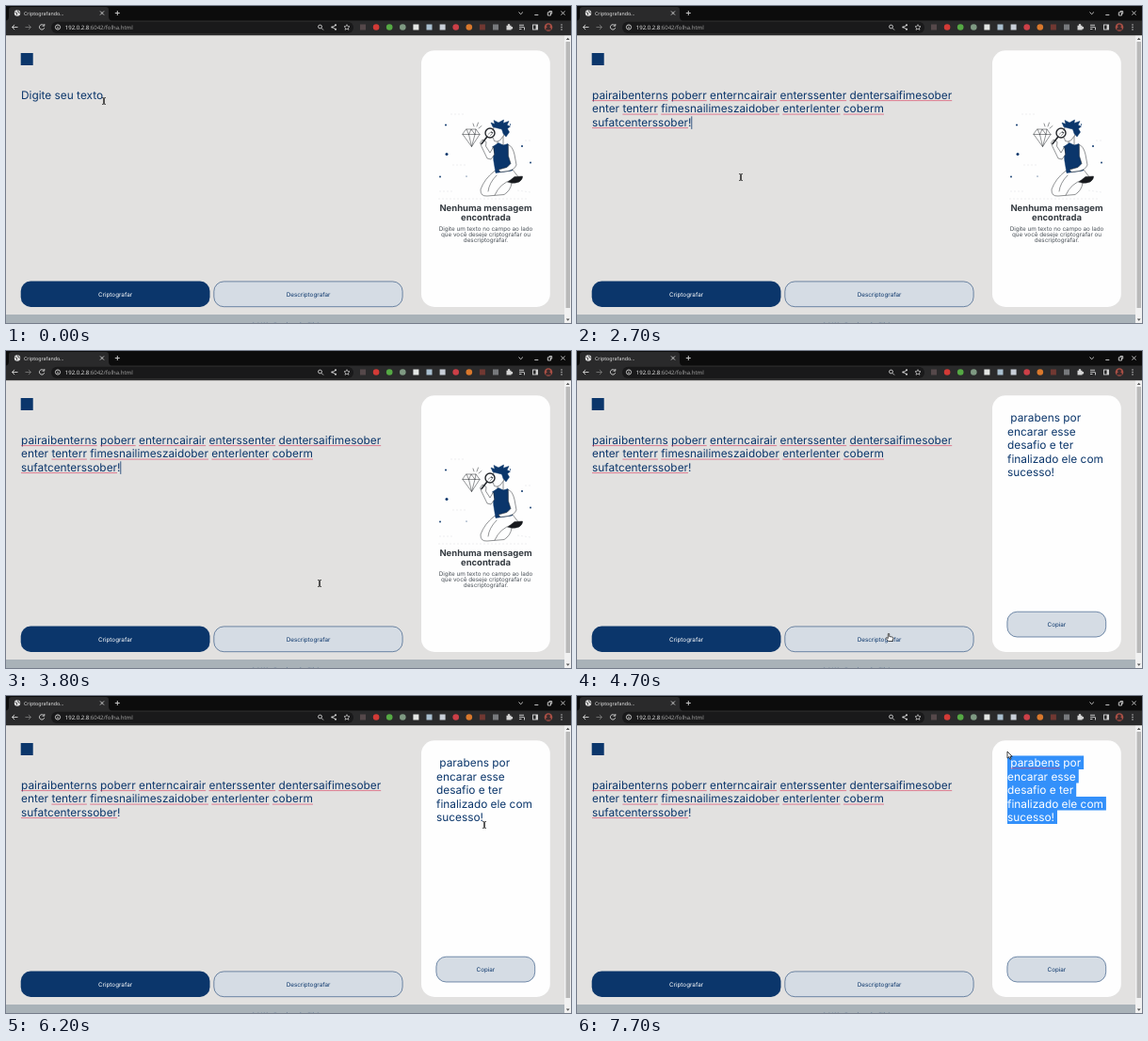
An HTML page that plays this animation: 600x337 px, repeating every 8 s.

```html
<!DOCTYPE html>
<html lang="pt">
<head>
<meta charset="utf-8">
<title>Criptografando...</title>
<style>
  html, body { margin: 0; width: 100%; height: 100%; overflow: hidden; background: #e2e1e0; }
  svg { display: block; width: 600px; height: 337px; }
  text { font-family: Inter, "Open Sans", sans-serif; font-optical-sizing: none; white-space: pre; text-rendering: geometricPrecision; }
  .big { font-size: 11.86px; fill: #0b366b; }
  .btn { font-size: 6.3px; fill: #0b366b; text-anchor: middle; }
  .head { font-size: 9.48px; font-weight: 700; fill: #343a40; text-anchor: middle; }
  .para { font-size: 6.3px; fill: #495057; text-anchor: middle; }
  .foot { font: 6.32px "Liberation Serif", serif; fill: #0b366b; text-anchor: middle; }
  .ui { font-family: "Noto Sans", "Open Sans", sans-serif; fill: #e4e4e4; }
  .ico { fill: none; stroke: #d6d6d6; stroke-width: .9; }
  .ink { fill: #fefefe; stroke: #23262b; stroke-width: .5; stroke-linejoin: round; stroke-linecap: round; }
  .line { fill: none; }
  .blue { fill: #0b366b; stroke: #0b366b; }
  .red { stroke: #d8365c; stroke-width: .6; }
  .pale { fill: #d5dce4; stroke: #0b366b; stroke-width: .55; }
</style>
</head>
<body>
<svg viewBox="0 0 600 337" xmlns="http://www.w3.org/2000/svg">
  <defs><clipPath id="sel"></clipPath></defs>
  <rect width="600" height="337" fill="#e2e1e0"/>

  <g id="page">
    <rect x="15.700" y="50" width="13" height="13" fill="#0b366b"/>
    <text id="hint" class="big" x="16" y="98.800">Digite seu texto</text>
    <g id="input"></g>
    <rect id="caret" width=".8" height="13.600" fill="#0b366b"/>

    <rect x="15.700" y="292.600" width="200.800" height="27.300" rx="10.500" fill="#0b366b"/>
    <text class="btn" x="116" y="308.500" style="fill:#fff">Criptografar</text>
    <rect class="pale" x="220.800" y="292.900" width="200.300" height="26.800" rx="10.500"/>
    <text class="btn" x="321" y="308.500">Descriptografar</text>

    <rect x="441" y="47.300" width="136.800" height="272.600" rx="14" fill="#fefefe"/>

    <g id="empty">
      <g fill="none" stroke="#dcdfe3" stroke-width=".5">
        <path d="M460 197h14M459 205h96M551 143h8M472 115h14M543 196l14 2M474 169h16" stroke-dasharray="2 2"/>
      </g>
      <g id="dots"></g>
      <g class="ink">
        <path d="M489 131h10l4 5.500L494.500 149.500 485 136.500zM485 136.500h18M489 131l2.500 5.500 3 13 3.500-13 1-5.500M491.500 136.500l2.500-5.500 4 5.500"/>
        <path class="line" d="M497 128l-1-3M500 128l1.500-4M502 130l3-2.500"/>
        <path d="M518 176Q508 184 504 195Q503.500 202.500 511 202L529 200.500Q536 196 537 188L545 183 538 174z"/>
        <path class="line" d="M537 185Q525 188 519 201M521 180Q513 188 512 197"/>
        <path d="M533 187Q537 184 540 181.500L548.500 181Q549 184 545 187Q540 189 536 188z" fill="#17191d"/>
        <path d="M522 140v7l6 1v-12z"/>
        <path d="M518 129Q516.500 134 517 137L515.800 139.500 517.500 140.500 518.500 143.500Q521 145 524.500 143L529 137 528 128z"/>
        <path class="blue" d="M517 128.500L515 124 519 125.500 518 121.500 523 124 528.500 121 528 124.500 534 122.500 532 126.500 535.500 128 532.500 130.500 534.500 134 531 139 528 135.500 526.500 131 520.500 129.500z"/>
        <path class="blue" d="M517 149.500L523 145.500 528 148 533 146.500Q538 159 537.500 175L520 177.500Q517 164 517 149.500z"/>
        <path d="M517.500 150L514 156 509.500 149 510 144.500 506 142 503.500 145.500 505 149.500 511 162 515 163 518.500 158z"/>
        <path d="M533.500 147.500Q538 149 540 158L542 169Q540 174 533 175.500L525 176.500 523 174 532 171.500 536 167.500 533.500 159.500z"/>
        <path class="line" d="M510.500 139.500L505 146.500" stroke-width="1.600"/>
        <circle cx="514" cy="135" r="5" fill="#fefefe" stroke-width="1.400"/>
        <path class="line" d="M512 136.500l4-3.500M514 138l3-3"/>
        <circle cx="516" cy="134.500" r=".5" fill="#23262b"/>
      </g>
      <text class="head" x="509.500" y="218.400">Nenhuma mensagem</text>
      <text class="head" x="509.500" y="227.800">encontrada</text>
      <text class="para" x="509.500" y="238.900">Digite um texto no campo ao lado</text>
      <text class="para" x="509.500" y="245.100">que você deseje criptografar ou</text>
      <text class="para" x="509.500" y="251.400">descriptografar.</text>
    </g>

    <g id="result">
      <g id="output"></g>
      <g clip-path="url(#sel)">
        <rect x="450" y="60" width="120" height="80" fill="#3390fa"/>
        <g id="picked"></g>
      </g>
      <path id="typo" class="red"/>
      <rect class="pale" x="456.900" y="277.200" width="104.800" height="26.800" rx="10.500"/>
      <text class="btn" x="509.400" y="292.500">Copiar</text>
    </g>

    <rect y="328" width="593" height="19" fill="#a9b2b8"/>
    <text class="foot" x="297" y="340.700">© 2022 - <tspan text-decoration="underline">Developer by Zib®</tspan></text>
  </g>

  <rect x="593" y="31" width="7" height="306" fill="#f1f1f1"/>
  <rect id="thumb" x="594.500" y="38" width="4.500" height="283" fill="#b9b9b9"/>
  <path d="M594.800 36l1.900-2.200 1.900 2.200zM594.800 332.500l1.900 2.200 1.900-2.200z" fill="#555"/>

  <rect width="600" height="16" fill="#0c0c0c"/>
  <path d="M0 31.300V15.500Q3 15 3 11V4Q3 1 6 1H106Q109 1 109 4V11Q109 15 112 15.500H600V31.300z" fill="#2a2a2b"/>
  <circle cx="12" cy="7.500" r="3.200" fill="#dedede"/>
  <path d="M9.500 6.500l2 1v2M12.500 4.500l.5 2 1.800 1" fill="none" stroke="#2a2a2b" stroke-width=".8"/>
  <text class="ui" x="19" y="9.500" font-size="5.300">Criptografando...</text>
  <rect x="48" y="16.800" width="321" height="12.200" rx="6.100" fill="#19191a"/>
  <text class="ui" x="62.800" y="24.800" font-size="6">192.0.2.8<tspan fill="#a2a2a2">:6042/folha.html</tspan></text>
  <g class="ico">
    <path d="M100 5.500l4 4m0-4l-4 4M115.800 7.500h5M118.300 5v5M544.500 6.500l2.200 2.200 2.200-2.200M561.300 9.500h4M575.300 6.800h3.200v3.200h-3.200zM576.700 5.500h3v3M589.500 5.500l4 4m0-4l-4 4"/>
    <path d="M12.500 22.500h-6m2.600-2.600l-2.600 2.600 2.600 2.600"/>
    <path d="M20.500 22.500h6m-2.600-2.600l2.600 2.600-2.600 2.600" stroke="#777"/>
    <path d="M40.300 20.800a2.700 2.700 0 1 0 .4 2.400M40.800 19v2.200h-2.200"/>
    <circle cx="55" cy="22.500" r="2.600"/><path d="M55 22v2M55 20.600v.7"/>
    <circle cx="333.500" cy="22" r="1.900"/><path d="M335 23.500l2 2"/>
    <path d="M350 20.500l-3.500 2 3.500 2.200"/>
    <path d="M362 19.700l.9 1.900 2.100.2-1.600 1.400.5 2.100-1.900-1.100-1.900 1.100.5-2.100-1.600-1.400 2.100-.2z" stroke-width=".7"/>
    <path d="M545 20.300h5M545 22.400h5M545 24.500h2.500M550.500 22.500v3"/>
    <rect x="559.500" y="20" width="5" height="5"/><path d="M563.500 20v5" stroke-width="1.800"/>
  </g>
  <g fill="#d6d6d6">
    <circle cx="350" cy="20.300" r="1"/><circle cx="346.300" cy="22.500" r="1"/><circle cx="350" cy="24.700" r="1"/>
    <path d="M531.500 20.800h1.400a1.200 1.200 0 1 1 2.200 0h1.400v1.400a1.200 1.200 0 1 1 0 2.200v1.200h-5z"/>
    <circle cx="590" cy="20" r=".7"/><circle cx="590" cy="22.500" r=".7"/><circle cx="590" cy="25" r=".7"/>
  </g>
  <g id="addons"></g>
  <circle cx="576" cy="22.500" r="4.300" fill="#a94f45"/>
  <path d="M573 25.500q0-2.500 1.700-2.700a1.900 1.900 0 1 1 2.600 0q1.700.2 1.700 2.700z" fill="#3a2b2c"/>

  <g id="mouse">
    <path id="beam" d="M-1.800-3.500q1.800 0 1.800 1v5q0 1-1.800 1M1.800-3.500q-1.800 0-1.800 1v5q0 1 1.800 1" fill="none" stroke="#111" stroke-width=".9"/>
    <path id="arrow" d="M0 0v7.200l1.700-1.500 1.200 2.600 1.200-.6-1.200-2.400h2.300z" fill="#fff" stroke="#111" stroke-width=".8"/>
    <path id="hand" d="M-.7.700q.7-1.200 1.400 0v2.800l3.300.6q.9.300.8 1.200l-.6 3.200h-4.500l-2.700-3q0-1 1-.8l1.300.9z" fill="#fff" stroke="#111" stroke-width=".7"/>
  </g>
</svg>
<script>
const $ = id => document.getElementById(id);
const LOOP = 8000, STEP = 100, LINE = 14.5;
const PASTE = 1600, SPELL = 1800, DECODE = 4500, DRAG = 6200;

const cipher = ["pairaibenterns poberr enterncairair enterssenter dentersaifimesober",
  "enter tenterr fimesnailimeszaidober enterlenter coberm", "sufatcenterssober!"];
const plain = [" parabens por", "encarar esse", "desafio e ter", "finalizado ele com", "sucesso!"];

// time, x, y
const path = [[0, 104, 101], [2000, 104, 101], [2700, 174, 182], [3000, 262, 214], [3300, 330, 235],
  [3800, 333, 247], [4000, 333, 247], [4400, 331, 300], [4800, 331, 300], [5200, 408, 252],
  [5700, 496, 170], [6200, 508, 137], [6600, 503, 130], [6900, 490, 112], [7000, 490, 112], [7700, 457, 59]];
const scroll = [[0, 0], [2900, 0], [3200, 10], [3600, 10], [3800, 0]];

function add(parent, tag, attrs, text = "") {
  const el = document.createElementNS("http://www.w3.org/2000/svg", tag);
  for (const k in attrs) el.setAttribute(k, attrs[k]);
  el.textContent = text;
  parent.appendChild(el);
  return el;
}

function at(keys, t, col) {
  const i = keys.findIndex(k => k[0] > t);
  if (i < 0) return keys[keys.length - 1][col];
  const a = keys[i - 1], b = keys[i];
  return a[col] + (b[col] - a[col]) * (t - a[0]) / (b[0] - a[0]);
}

const show = (el, on) => el.setAttribute("visibility", on ? "visible" : "hidden");

function write(parent, lines, x, y, fill) {
  return lines.map((s, i) => add(parent, "text",
    { class: "big", x, y: y + i * LINE, style: fill ? "fill:" + fill : "" }, s));
}

// path under every matching word of a line
function marks(el, skip) {
  const s = el.textContent, x0 = +el.getAttribute("x"), y = +el.getAttribute("y") + 1.8;
  let d = "";
  for (const m of s.matchAll(/[a-z]+/g)) {
    if (skip(m[0])) continue;
    const x = x0 + (m.index ? el.getSubStringLength(0, m.index) : 0);
    d += `M${x} ${y}h${el.getSubStringLength(m.index, m[0].length)}`;
  }
  return d;
}

const typed = write($("input"), cipher, 16, 98.8);
const spell = add($("input"), "path", { class: "red", d: typed.map(l => marks(l, w => w === "enter")).join("") });
const rows = write($("output"), plain, 457, 75);
write($("picked"), plain, 457, 75, "#fff");
$("typo").setAttribute("d", marks(rows[0], w => w !== "parabens"));
const bars = rows.map((r, i) => add($("sel"), "rect", { x: 457, y: 63.6 + i * LINE, width: 0, height: 14.5 }));
const caretEnd = 16 + typed[2].getComputedTextLength();

// left edge of the character nearest to x
function snap(row, x) {
  const n = row.getNumberOfChars();
  let best = 457;
  for (let i = 1; i <= n; i++) {
    const e = 457 + row.getSubStringLength(0, i);
    if (Math.abs(e - x) < Math.abs(best - x)) best = e;
  }
  return best;
}

function select(on, x, y) {
  const cur = Math.max(0, Math.min(4, Math.floor((y - 63.6) / LINE)));
  rows.forEach((r, i) => {
    const end = 457 + r.getComputedTextLength() + 3;
    const start = i > cur ? 457 : snap(r, x);
    const w = on && i >= cur ? end - start : 0;
    bars[i].setAttribute("x", start);
    bars[i].setAttribute("width", w <= 3.1 ? 0 : w);
  });
}

function pointer(x, y) {
  if (x > 16 && x < 421 && y > 293 && y < 320) return "hand";
  if (x > 16 && x < 421 && y < 290) return "beam";
  if (x >= 457 && x < 562 && y > 64 && y < 270) return "beam";
  return "arrow";
}

[[467, 126.5, 1], [468, 157.5, 1.5], [461, 181.5, .9], [548, 149, 1], [557, 166.5, .9], [535.5, 126, .7], [489, 181, .6]]
  .forEach(([cx, cy, r]) => add($("dots"), "circle", { cx, cy, r, fill: "#0b366b" }));
["#55484a", "#d23a36", "#55a944", "#7f9a83", "#e4e6e4", "#a9bfd0", "#c9cfd8", "#cc3f47", "#d9782c", "#713832", "#77797c"]
  .forEach((fill, i) => {
    const cx = 379 + i * 14.1, cy = 22.5;
    if ([1, 2, 3, 7, 8].includes(i)) add($("addons"), "circle", { cx, cy, r: 3.3, fill });
    else add($("addons"), "rect", { x: cx - 3, y: cy - 3, width: 6, height: 6, fill });
  });

function caretOn(t) {
  if (t < PASTE) return (t >= 100 && t < 500) || (t >= 1000 && t < 1400);
  return t < DECODE && (t - PASTE) % 1000 < 500;
}

function draw(now) {
  const t = Math.floor(now % LOOP / STEP) * STEP;
  const x = at(path, t, 1), y = at(path, t, 2), top = at(scroll, t, 1);
  const pasted = t >= PASTE;
  $("page").setAttribute("transform", `translate(0 ${-top})`);
  $("thumb").setAttribute("y", 38 + top * .92);
  show($("hint"), !pasted);
  show($("input"), pasted);
  show(spell, t >= SPELL);
  show($("caret"), caretOn(t));
  $("caret").setAttribute("x", pasted ? caretEnd : 15.6);
  $("caret").setAttribute("y", 88.3 + (pasted ? 2 * LINE : 0));
  show($("empty"), t < DECODE);
  show($("result"), t >= DECODE);
  show($("typo"), t > DRAG);
  select(t > DRAG, x, y);
  $("mouse").setAttribute("transform", `translate(${x} ${y})`);
  const kind = pointer(x, y);
  for (const k of ["beam", "arrow", "hand"]) show($(k), k === kind);
}

const begin = performance.now();
function tick() {
  draw(performance.now() - begin);
  requestAnimationFrame(tick);
}
tick();
</script>
</body>
</html>
```
